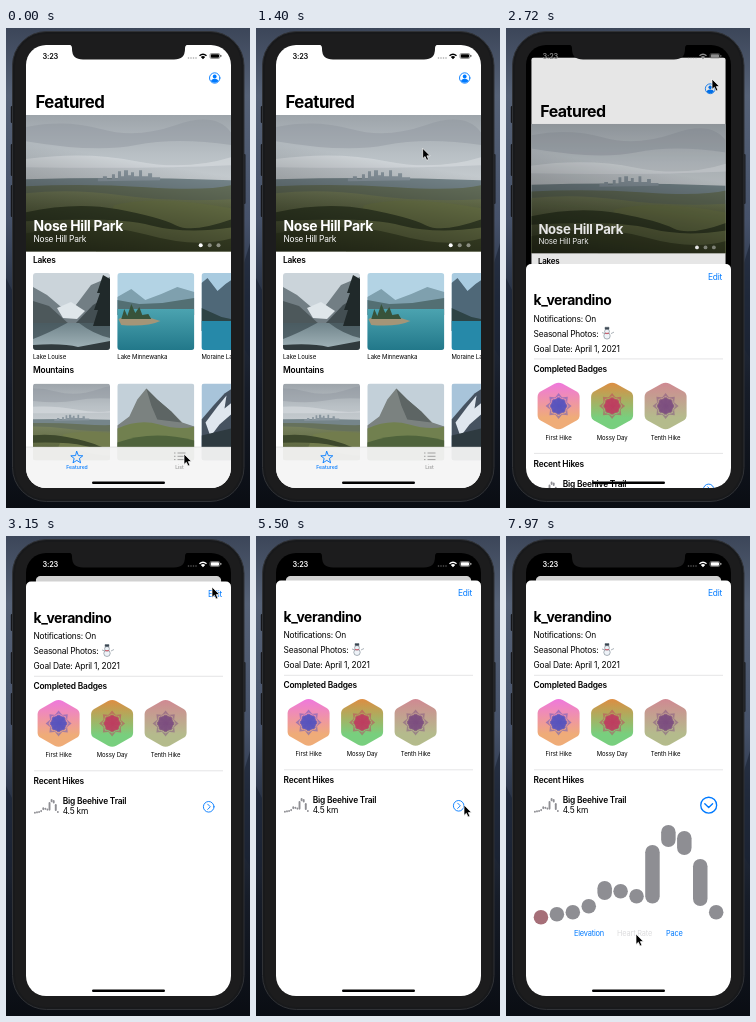
Write an HTML page that moves like this. It is 244 by 480 pixels and loops after 8 s.

```html
<!DOCTYPE html>
<html lang="en">
<head>
<meta charset="utf-8">
<title>Parks app</title>
<style>
html, body { margin: 0; width: 100%; height: 100%; overflow: hidden; background: #0c1018; }
svg { display: block; }
#stage { width: 100vw; height: 100vh; }
text { font: 400 8.4px Inter, "Open Sans", sans-serif; letter-spacing: -.025em; }
.big { font-size: 16.8px; font-weight: 700; letter-spacing: -.03em; }
.title { font-size: 13.9px; font-weight: 700; }
.head { font-weight: 600; }
.cap { font-size: 6px; letter-spacing: -.01em; }
.tab { font-size: 5.1px; font-weight: 500; letter-spacing: 0; }
.btn { font-size: 7.4px; fill: #007aff; }
.mid { text-anchor: middle; }
.blue { fill: #007aff; }
.line { fill: none; stroke: #007aff; stroke-linecap: round; stroke-linejoin: round; }
</style>
</head>
<body>
<svg id="stage" viewBox="0 0 244 480" preserveAspectRatio="none">
<defs>
  <linearGradient id="wall" x2="0" y2="1">
    <stop stop-color="#3c4659"/><stop offset=".14" stop-color="#566277"/>
    <stop offset=".4" stop-color="#46526a"/><stop offset=".55" stop-color="#2a3447"/>
    <stop offset=".75" stop-color="#171d29"/><stop offset="1" stop-color="#0a0d13"/>
  </linearGradient>
  <linearGradient id="clouds" x2="0" y2="1">
    <stop stop-color="#9da4aa"/><stop offset=".5" stop-color="#b9c0c5"/><stop offset="1" stop-color="#ccd1d4"/>
  </linearGradient>
  <linearGradient id="grass" x2="0" y2="1">
    <stop stop-color="#77805c"/><stop offset=".45" stop-color="#656f47"/><stop offset="1" stop-color="#4f5935"/>
  </linearGradient>
  <linearGradient id="shade" x1="0" y1="1" x2=".25" y2="0">
    <stop stop-opacity=".62"/><stop offset=".75" stop-opacity="0"/>
  </linearGradient>
  <linearGradient id="teal" x2="0" y2="1"><stop stop-color="#4ba3b0"/><stop offset="1" stop-color="#22788a"/></linearGradient>
  <linearGradient id="lake" x2="0" y2="1"><stop stop-color="#71858c"/><stop offset="1" stop-color="#a3b5ba"/></linearGradient>
  <linearGradient id="hex" x2="0" y2=".75"><stop stop-color="#ef78dd"/><stop offset="1" stop-color="#efac78"/></linearGradient>
  <clipPath id="screen"><rect x="20" y="17" width="205" height="443" rx="20"/></clipPath>
  <clipPath id="card"><rect id="cardBox" x="20" y="17" width="205" height="443"/></clipPath>
  <clipPath id="thumb"><rect width="77" height="77" rx="3"/></clipPath>

  <symbol id="park" viewBox="0 0 205 136" preserveAspectRatio="xMidYMid slice">
    <rect width="205" height="80" fill="url(#clouds)"/>
    <path d="M0 12Q40 4 75 14T150 10T205 18V30Q150 22 110 30T0 26Z" fill="#8e969d" opacity=".45"/>
    <path d="M0 44Q60 36 110 46T205 42V50Q120 54 0 52Z" fill="#dde1e3" opacity=".55"/>
    <path d="M0 64Q100 61 205 65V90H0Z" fill="#75858a"/>
    <path d="M72 66v-3h5v-2h4v3h5v-5h3v4h3v-7h3v5h3v-6h4v5h3v-3h3v4h5v-6h3v6h6v-3h4v4h8v3Z" fill="#89969f"/>
    <path d="M0 71Q60 68 120 72T205 70V136H0Z" fill="#66715c"/>
    <path d="M0 78Q45 73 95 80T205 84V136H0Z" fill="url(#grass)"/>
    <path d="M88 90Q130 79 205 93V136H70Z" fill="#727c4d"/>
    <path d="M0 97Q50 86 92 94T150 110T205 104V112Q160 119 125 110T0 106Z" fill="#3d482c"/>
    <path d="M0 118Q70 105 120 119T205 123V136H0Z" fill="#4c5631"/>
  </symbol>
</defs>

<rect width="244" height="480" fill="url(#wall)"/>
<path d="M0 250L6 262V330L0 345ZM244 215L238 235V320L244 330Z" fill="#1a2232" opacity=".6"/>
<g fill="#15161a">
  <rect x="4.8" y="78" width="4" height="17" rx="1"/><rect x="4.8" y="116" width="4" height="32" rx="1"/>
  <rect x="4.8" y="157" width="4" height="32" rx="1"/><rect x="235.5" y="126" width="4" height="50" rx="1"/>
</g>
<rect x="6.5" y="3.5" width="231.5" height="470" rx="34" fill="#18191b" stroke="#303236"/>
<rect x="9" y="6" width="226.5" height="465" rx="31" fill="#1c1c1d"/>

<g clip-path="url(#screen)">
  <rect x="20" y="17" width="205" height="443"/>
  <g id="page"><g clip-path="url(#card)">
    <rect x="20" y="17" width="205" height="443" fill="#fff"/>
    <g class="line" stroke-width=".9"><circle cx="208.7" cy="50" r="5.2"/></g>
    <g class="blue"><circle cx="208.7" cy="48.5" r="1.9"/><path d="M205 53.3Q205.4 50.8 208.7 50.8T212.4 53.3Q208.7 56 205 53.3Z"/></g>
    <text class="big" x="29.5" y="79.5">Featured</text>
    <use href="#park" x="20" y="87" width="205" height="136.5"/>
    <rect x="20" y="87" width="205" height="136.5" fill="url(#shade)"/>
    <g fill="#fff">
      <text class="title" x="27.5" y="203">Nose Hill Park</text>
      <text x="27.5" y="213.7">Nose Hill Park</text>
      <circle cx="194.7" cy="217.3" r="2"/>
      <g opacity=".45"><circle cx="203.7" cy="217.3" r="2"/><circle cx="212.5" cy="217.3" r="2"/></g>
    </g>
    <text class="head" x="27" y="234.5">Lakes</text>
    <g transform="translate(27 245)"><g clip-path="url(#thumb)">
      <rect width="77" height="77" fill="#cbd4da"/>
      <path d="M0 14L14 22 27 33 38 38 46 28 58 12 77 4V54H0Z" fill="#727e84"/>
      <path d="M24 35L38 29 52 38 44 46 30 45Z" fill="#dfe6ea"/>
      <path d="M0 28L16 33 36 51H0Z" fill="#4d585b"/><path d="M77 22L60 32 42 51H77Z" fill="#434e52"/>
      <rect y="50" width="77" height="27" fill="url(#lake)"/>
      <path d="M0 50H34Q16 60 0 66ZM77 50H46Q60 61 77 65Z" fill="#3b4a50" opacity=".7"/>
      <path d="M70 2L64 20 67 20 61 37 65 37 60 53H77V6Z" fill="#20292a"/>
      <path d="M0 72Q30 70 45 74L77 68V77H0Z" fill="#303a3d"/>
    </g></g>
    <g transform="translate(111.3 245)"><g clip-path="url(#thumb)">
      <rect width="77" height="77" fill="#b3d3e4"/>
      <path d="M0 24L14 16 28 27 44 21 60 14 77 19V42H0Z" fill="#7fa0ae"/>
      <path d="M0 27L22 31 45 30 77 25V42H0Z" fill="#536f73"/>
      <rect y="36" width="77" height="41" fill="url(#teal)"/>
      <path d="M1 46Q12 41 27 43L43 48Q30 54 4 52Z" fill="#a49578"/>
      <path d="M4 46L7 36 10 43 14 31 18 40 22 34 25 42 31 41 34 46Z" fill="#38533a"/>
    </g></g>
    <g transform="translate(195.5 245)"><g clip-path="url(#thumb)">
      <rect width="77" height="77" fill="#a9cbe0"/>
      <path d="M0 10L6 5 16 18 24 11 34 4 77 12V58H0Z" fill="#4f6878"/>
      <path d="M0 35L20 44 34 47V58H0Z" fill="#2d4345"/>
      <rect y="48" width="77" height="29" fill="#2689a9"/>
    </g></g>
    <text class="cap" x="27" y="331">Lake Louise</text>
    <text class="cap" x="111.3" y="331">Lake Minnewanka</text>
    <text class="cap" x="195.5" y="331">Moraine Lake</text>
    <text class="head" x="27" y="345">Mountains</text>
    <g transform="translate(27 355.5)"><g clip-path="url(#thumb)"><use href="#park" width="77" height="77"/></g></g>
    <g transform="translate(111.3 355.5)"><g clip-path="url(#thumb)">
      <rect width="77" height="77" fill="#c3d0d9"/>
      <path d="M0 42L12 33 20 16 29 5 40 16 54 28 65 39 77 43V77H0Z" fill="#7b8280"/>
      <path d="M29 5L40 16 54 28 64 39 40 36 34 22Z" fill="#5d6564"/>
      <path d="M0 45Q22 35 42 41T77 43V77H0Z" fill="#71804f"/>
      <path d="M0 59Q35 46 77 57V77H0Z" fill="#4f633c"/>
    </g></g>
    <g transform="translate(195.5 355.5)"><g clip-path="url(#thumb)">
      <rect width="77" height="77" fill="#a8c4da"/>
      <path d="M0 36L12 22 23 10 34 3 77 20V77H0Z" fill="#465260"/>
      <path d="M4 39L16 23 25 12 23 25 34 16V27L18 41 9 53Z" fill="#dfe6ee"/>
      <path d="M0 52L34 44V77H0Z" fill="#2e3a40"/>
    </g></g>
    <rect x="20" y="419" width="205" height="41" fill="#f5f5f5" opacity=".95"/>
    <path d="M20 419H225" stroke="#c4c4c4" stroke-width=".4"/>
    <path class="line" stroke-width=".9" d="M70.8 423.5l1.6 4.1 4.4.2-3.4 2.7 1.2 4.3-3.8-2.4-3.8 2.4 1.2-4.3-3.4-2.7 4.4-.2Z"/>
    <path d="M168 425h1.5m2 0h8M168 428.3h1.5m2 0h8M168 431.6h1.5m2 0h8" stroke="#999" stroke-width=".9"/>
    <text class="tab mid blue" x="71" y="441.2">Featured</text>
    <text class="tab mid" x="173.5" y="441.2" fill="#999">List</text>
    <rect id="dim" x="20" y="17" width="205" height="443"/>
  </g></g>

  <g id="sheet">
    <rect x="20" y="44.5" width="205" height="440" rx="5" fill="#fff"/>
    <text class="blue" x="202" y="60.4">Edit</text>
    <text class="title" x="27.5" y="85.8">k_verandino</text>
    <text x="27.5" y="102">Notifications: On</text>
    <text x="27.5" y="117">Seasonal Photos:</text>
    <g stroke="#596773" stroke-width=".5" fill="#eef3f8">
      <path d="M96 113l3 1m6 0l3-1.5" fill="none"/>
      <circle cx="101" cy="116.3" r="3.2"/><circle cx="101" cy="111.8" r="2.4"/>
      <path d="M99 109.6v-2h4v2Z" fill="#38424c"/><path d="M99.2 113.7h3.6" stroke="#d34" stroke-width=".8"/>
    </g>
    <text x="27.5" y="132.3">Goal Date: April 1, 2021</text>
    <path d="M28 139.3H217M28 233.8H217" stroke="#d4d4d6" stroke-width=".6"/>
    <text class="head" x="27.5" y="152.4">Completed Badges</text>
    <g id="badges"></g>
    <text class="head" x="27.5" y="247">Recent Hikes</text>
    <g id="mini" transform="translate(28 262) scale(.131 .149) translate(-28 -289)"></g>
    <text class="head" x="56.7" y="267.2">Big Beehive Trail</text>
    <text x="56.7" y="277.3">4.5 km</text>
    <g id="chevron" class="line" stroke-width=".9"><circle r="5.3"/><path d="M-1 -2.6L1.6 0 -1 2.6"/></g>
    <g id="graph"></g>
    <g id="tabs">
      <text class="btn" x="68" y="399.5">Elevation</text>
      <text class="btn" x="111" y="399.5">Heart Rate</text>
      <text class="btn" x="160" y="399.5">Pace</text>
    </g>
  </g>
  <path d="M62 16H183Q179 17 179 20V21Q179 31.5 168 31.5H77Q66 31.5 66 21V20Q66 17 62 16Z" fill="#1c1c1d"/>
  <g id="status">
    <text class="head" x="36.5" y="30.8" style="font-size:7.4px">3:23</text>
    <g opacity=".35"><circle cx="182.5" cy="30" r=".8"/><circle cx="185" cy="30" r=".8"/><circle cx="187.5" cy="30" r=".8"/><circle cx="190" cy="30" r=".8"/></g>
    <path d="M193 27.2Q197 23.6 201 27.2L200 28.3Q197 25.7 194 28.3ZM194.8 29Q197 27.2 199.2 29L197 31.2Z"/>
    <rect x="204" y="25.5" width="9.8" height="5" rx="1.4" fill="none" stroke="currentColor" stroke-width=".4"/>
    <rect x="204.8" y="26.3" width="8.2" height="3.4" rx=".8"/><rect x="214.5" y="27.1" width=".8" height="1.8" rx=".4"/>
  </g>
  <rect x="86" y="453.4" width="73" height="2.5" rx="1.25"/>
</g>
<path id="cursor" d="M0 0V10.4L2.4 8.3 4 12 5.9 11.2 4.3 7.6H7.5Z" stroke="#fff" stroke-width=".7"/>
</svg>
<script>
const LOOP = 8000, GRAY = '#8e8e93', BLUE = '#007aff';
const $ = id => document.getElementById(id);
const clamp = v => Math.max(0, Math.min(1, v));
const mix = (a, b, p) => a + (b - a) * p;
const smooth = v => (v = clamp(v), v * v * (3 - 2 * v));

// Badges: one mountain mark turned eight times on a hexagon
const mark = 'M0-13L-4.3-7.6 0-10 4.3-7.6ZM0-9L-4.3-6.4-9 1.5H9L4.3-6.4Z';
const petals = [...Array(8)].map((_, i) => `<path d="${mark}" transform="rotate(${i * 45})"/>`).join('');
const hexagon = 'M-4-22.3Q0-24.4 4-22.3L18-14.4Q21-12.6 21-9V9Q21 12.6 18 14.4L4 22.3Q0 24.4-4 22.3L-18 14.4Q-21 12.6-21 9V-9Q-21-12.6-18-14.4Z';
$('badges').innerHTML = [
  ['First Hike', 'none'],
  ['Mossy Day', 'hue-rotate(90deg)'],
  ['Tenth Hike', 'grayscale(.5) hue-rotate(45deg)']
].map(([name, filter], i) => `<g transform="translate(${52.6 + i * 53.5} 186.4)">
  <g style="filter:${filter}"><path d="${hexagon}" fill="url(#hex)"/><g fill="#4f4fbf" opacity=".95" fill-opacity=".5">${petals}</g></g>
  <text class="cap mid" y="33.5">${name}</text></g>`).join('');

// Elevation ranges: top and bottom of each capsule
const ranges = [[374, 388.5], [371, 385.5], [369, 383.5], [363, 377.5], [345, 364], [348, 362.5],
  [353, 367.5], [309, 367.5], [289, 311], [295, 319], [323, 370], [369, 383.5]];
$('mini').innerHTML = $('graph').innerHTML = ranges.map(([top, end], i) =>
  `<rect x="${27.7 + i * 15.93}" y="${top}" width="14.5" height="${end - top}" rx="7.25" fill="${GRAY}"/>`).join('');
const capsules = [...$('graph').children], tabs = [...$('tabs').children];

// Underdamped spring, falling from 1 to 0
function ripple(s) {
  if (s <= 0) return 1;
  const a = 19.79 * s;
  return Math.exp(-11.42 * s) * (Math.cos(a) + .577 * Math.sin(a));
}

const stops = [[30, 178, 426], [730, 127, 190], [1000, 127, 190], [1800, 206, 51], [3510, 206, 51], [4280, 119, 282],
  [4950, 119, 282], [5480, 208, 269], [5520, 208, 269], [5740, 201, 270.5], [6870, 201, 270.5], [7370, 130, 398], [LOOP, 130, 398]];
function cursorAt(t) {
  const i = stops.findIndex(s => s[0] > t);
  if (i < 1) return stops[0].slice(1);
  const [t0, x0, y0] = stops[i - 1], [t1, x1, y1] = stops[i], p = smooth((t - t0) / (t1 - t0));
  return [mix(x0, x1, p), mix(y0, y1, p)];
}

function draw(t) {
  const [x, y] = cursorAt(t);
  $('cursor').setAttribute('transform', `translate(${x} ${y})`);

  // Sheet rises on a critically damped spring; the page shrinks behind it
  const w = Math.max(0, t - 2600) * .015;
  const open = t > 3310 ? 1 : 1 - (1 + w) * Math.exp(-w);
  $('sheet').setAttribute('transform', `translate(0 ${(1 - open) * 418})`);
  $('page').setAttribute('transform', `translate(122.5 ${mix(17, 40, open)}) scale(${mix(1, .905, open)}) translate(-122.5 -17)`);
  $('cardBox').setAttribute('rx', 5.5 * open);
  $('dim').setAttribute('opacity', .18 * open);
  const ink = Math.round(255 * clamp(open * 1.2 - .1));
  $('status').style.fill = $('status').style.color = `rgb(${ink},${ink},${ink})`;

  // Details open: chevron turns, capsules ripple in from the right
  const since = t < 6040 ? 0 : t - 5935, turn = smooth(since / 350);
  $('chevron').setAttribute('transform', `translate(202.7 ${mix(269.8, 269.2, turn)}) rotate(${90 * turn}) scale(${1 + .5 * turn})`);
  $('chevron').setAttribute('opacity', t > 5870 && t < 6040 ? .45 : 1);
  capsules.forEach((c, i) => {
    const off = ripple((since - 30 * i) / 1000);
    c.setAttribute('transform', `translate(${off * 190} 0)`);
    c.setAttribute('opacity', clamp(1 - off));
  });
  $('tabs').setAttribute('transform', `translate(${190 * (1 - turn)} 0)`);
  $('tabs').setAttribute('opacity', turn);

  const pressed = t >= 7970;
  capsules[0].style.fill = pressed ? '#a66f78' : GRAY;
  tabs[0].style.fill = pressed ? BLUE : '#96969b';
  tabs[1].style.fill = pressed ? '#dcdcde' : BLUE;
}

function tick() {
  draw(performance.now() % LOOP);
  requestAnimationFrame(tick);
}
tick();
</script>
</body>
</html>
```
